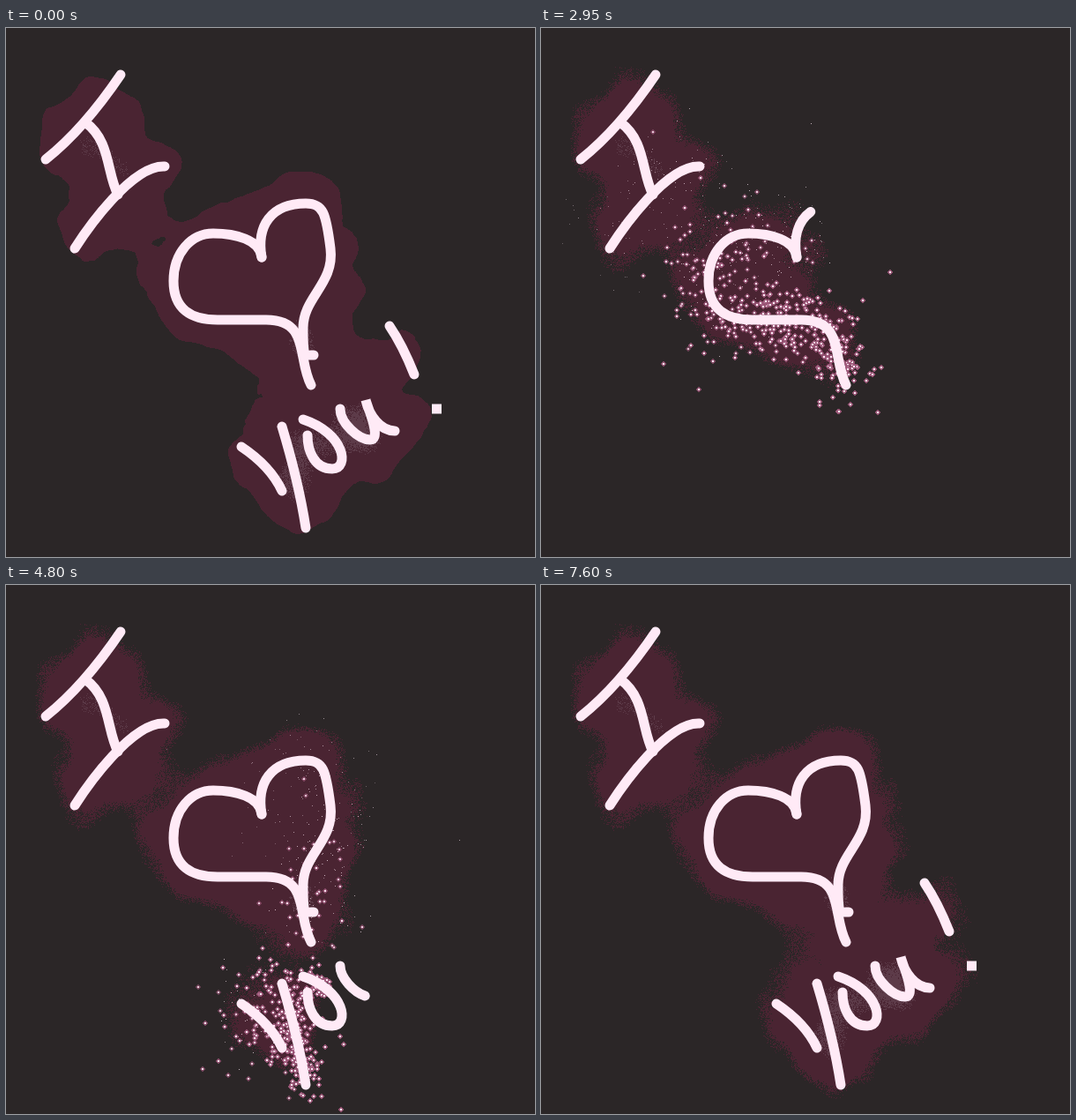
Animation, 600 px wide and 600 px high, one loop 7700 ms. Source, as an HTML page with a canvas:

```html
<!DOCTYPE html>
<html lang="en">
<head>
<meta charset="utf-8">
<title>I love you</title>
<style>
html, body { margin: 0; width: 100%; height: 100%; overflow: hidden; background: #2b2627; }
canvas { display: block; width: 100vw; height: 100vh; }
</style>
</head>
<body>
<canvas id="stage" width="600" height="600"></canvas>
<script>
const SIZE = 600, LOOP = 7700, FRAME = 50;
const SPEED = 0.42;        // pen speed in px per ms
const SPARK_RATE = 0.7;    // sparks per ms of drawing
const SPARK_LAG = 350, HAZE_LAG = 300, GLOW_LAG = 1000;
const SPREAD = 29, HAZE_RADIUS = 28, HAZE_LIMIT = 14, GLOW_SHARE = 0.82;
const INK = '#ffeaf6', HALO = '#a05a7c';
const BACK = 0xff27262b, HAZE = 0xff32244a, GLOW = 0xff493b5d; // ABGR
const ctx = document.getElementById('stage').getContext('2d');

let seed = 7;
function random() {
  seed = (seed * 1664525 + 1013904223) % 4294967296;
  return seed / 4294967296;
}
const gauss = () => Math.sqrt(-2 * Math.log(random() + 1e-9)) * Math.cos(2 * Math.PI * random());
const clamp = x => Math.max(0, Math.min(1, x));

function stroke(start, d, cap = 'round') {
  const curve = document.createElementNS('http://www.w3.org/2000/svg', 'path');
  curve.setAttribute('d', d);
  const length = curve.getTotalLength();
  return { start, cap, curve, length, shape: new Path2D(d) };
}

const strokes = [
  // I
  stroke(400, 'M130 53 Q88 115 45 149'),
  stroke(762, 'M90 107 C119 128 114 165 127 189'),
  stroke(1041, 'M78 250 C92 228 143 155 180 157'),
  // heart
  stroke(1434, 'M290 260 C288 240 260 233 235 233 S190 255 190 287 S210 331 240 331 H295 C345 331 330 375 346 405'),
  stroke(2815, 'M290 260 C284 225 300 199 340 199 C360 199 363 210 368 250 S337 305 337 340 S338 371 349 371'),
  // you
  stroke(3620, 'M267 475 Q300 497 313 525'),
  stroke(4020, 'M313 452 Q332 515 340 567'),
  stroke(4370, 'M337 444 C385 460 390 500 370 500 S342 480 342 462'),
  stroke(4690, 'M379 432 C379 448 400 467 413 467 S412 435 408 422 C412 440 425 457 441 457'),
  // exclamation mark
  stroke(5150, 'M435 338 Q450 360 463 393'),
  stroke(5480, 'M483 432 H494', 'butt')
];

// Sparks leave the stroke in drawing order, with a small burst at both ends.
const sparks = strokes.flatMap(({ start, curve, length }) => {
  const time = length / SPEED, burst = 5, count = Math.round(time * SPARK_RATE);
  return Array.from({ length: count + 2 * burst }, (_, i) => {
    const p = clamp((i - burst) / count);
    const { x, y } = curve.getPointAtLength(p * length);
    const reach = random() < 0.08 ? 2 * SPREAD : SPREAD;
    return {
      x: x + gauss() * 4, y: y + gauss() * 4,
      dx: gauss() * reach, dy: gauss() * reach,
      born: start + SPARK_LAG + p * time,
      life: 900 + 800 * random()
    };
  });
});

// Each spark leaves a soft stain; a pixel turns to haze once its stains exceed a grainy limit.
const density = new Float32Array(SIZE * SIZE);
const grain = density.map(() => 0.7 + 0.6 * random());
const hazeTime = new Float32Array(SIZE * SIZE).fill(Infinity);
for (const s of sparks) {
  const cx = Math.round(s.x + s.dx), cy = Math.round(s.y + s.dy);
  for (let y = Math.max(0, cy - HAZE_RADIUS); y <= Math.min(SIZE - 1, cy + HAZE_RADIUS); y++) {
    for (let x = Math.max(0, cx - HAZE_RADIUS); x <= Math.min(SIZE - 1, cx + HAZE_RADIUS); x++) {
      const i = y * SIZE + x;
      density[i] += Math.max(0, 1 - ((x - cx) ** 2 + (y - cy) ** 2) / HAZE_RADIUS ** 2);
      if (hazeTime[i] === Infinity && density[i] > HAZE_LIMIT * grain[i]) hazeTime[i] = s.born + HAZE_LAG;
    }
  }
}
const glowLimit = GLOW_SHARE * density.reduce((a, b) => Math.max(a, b));

const image = ctx.createImageData(SIZE, SIZE);
const pixels = new Uint32Array(image.data.buffer);

function drawHaze(t, smooth) {
  for (let i = 0; i < pixels.length; i++) {
    const hazy = smooth ? density[i] > HAZE_LIMIT : t >= hazeTime[i];
    const glows = density[i] > glowLimit * (1 + grain[i]) / 2 && t >= hazeTime[i] + GLOW_LAG;
    pixels[i] = glows ? GLOW : hazy ? HAZE : BACK;
  }
  ctx.putImageData(image, 0, 0);
}

function drawSparks(t) {
  for (const s of sparks) {
    const age = t - s.born;
    if (age < 0 || age > s.life) continue;
    const spread = 1 - Math.exp(-age / 420), fade = 1 - age / s.life;
    const x = Math.round(s.x + s.dx * spread), y = Math.round(s.y + s.dy * spread);
    const bright = fade > 0.3, size = bright ? 2 : 1;
    if (bright) {
      ctx.globalAlpha = Math.min(0.8, fade * 1.3);
      ctx.fillStyle = HALO;
      ctx.fillRect(x - 2, y, 6, 2);
      ctx.fillRect(x, y - 2, 2, 6);
      ctx.fillRect(x - 1, y - 1, 4, 4);
    }
    ctx.globalAlpha = Math.min(1, 0.25 + fade * 1.6);
    ctx.fillStyle = INK;
    ctx.fillRect(x, y, size, size);
  }
  ctx.globalAlpha = 1;
}

function drawInk(t) {
  ctx.strokeStyle = INK;
  ctx.lineWidth = 11;
  for (const { start, length, cap, shape } of strokes) {
    if (t < start) continue;
    const drawn = (t - start) * SPEED;
    ctx.lineCap = cap;
    ctx.setLineDash(drawn < length ? [drawn + 0.1, 2 * length] : []);
    ctx.stroke(shape);
  }
}

function draw(t) {
  const opening = t < FRAME;
  const shown = opening ? LOOP : t;
  drawHaze(shown, opening);
  drawSparks(t);
  drawInk(shown);
}

const began = performance.now();
function tick() {
  const t = (performance.now() - began) % LOOP;
  draw(Math.floor(t / FRAME) * FRAME);
  requestAnimationFrame(tick);
}
tick();
</script>
</body>
</html>
```
